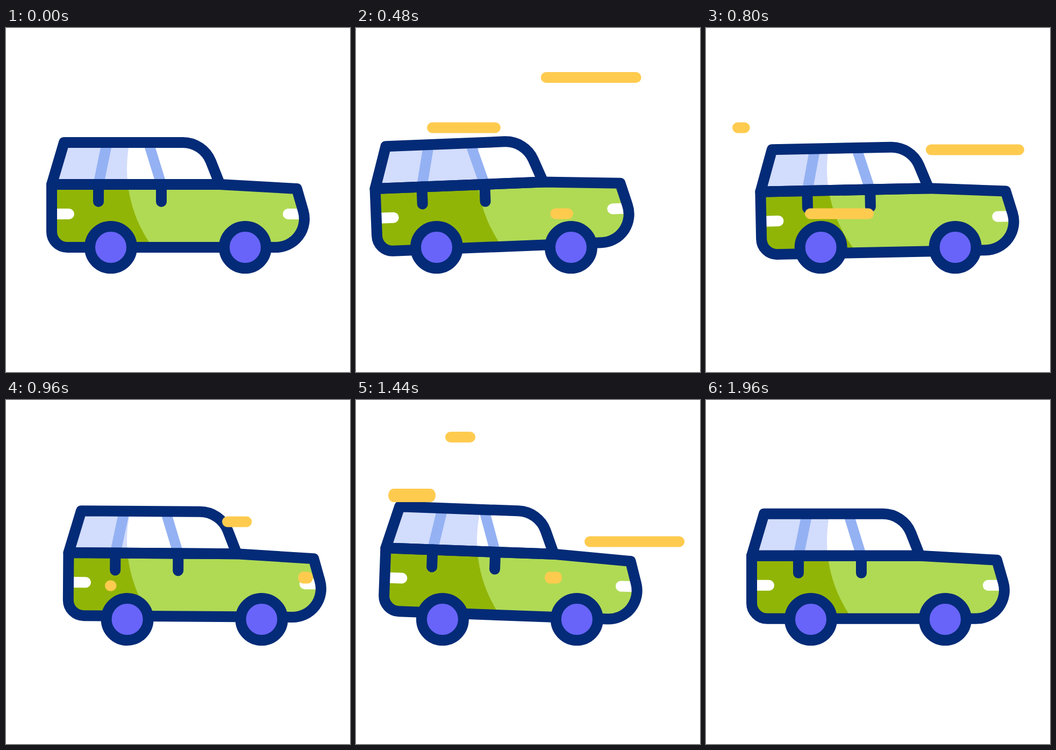
Animation of 640 by 640 pixels, one loop 2 s. Source, as an HTML page:

```html
<!DOCTYPE html>
<html lang="en">
<head>
<meta charset="utf-8">
<title>Bouncing car</title>
<style>
  html, body { margin: 0; width: 100%; height: 100%; overflow: hidden; background: #fff; }
  svg { display: block; width: 100%; height: 100%; }
  .line { fill: none; stroke: #042b77; stroke-width: 20; stroke-linecap: round; stroke-linejoin: round; }
</style>
</head>
<body>
<svg viewBox="0 0 640 640">
  <defs>
    <path id="body" d="M85 291V379A29 29 0 0 0 114 408H502A53 53 0 0 0 552.9 340.2L541 299L398 291Z"/>
    <path id="cabin" d="M85 291L108 213H329A56 56 0 0 1 381 248L398 291Z"/>
    <clipPath id="bodyClip"><use href="#body" class="pose"/></clipPath>
    <clipPath id="cabinClip"><use href="#cabin" class="pose"/></clipPath>
  </defs>

  <!-- The shade edge stays fixed on the stage while the car moves under it. -->
  <g clip-path="url(#cabinClip)">
    <rect width="640" height="640" fill="#d2dcfc"/>
    <circle cx="471" cy="262" r="246" fill="#fff"/>
  </g>
  <g clip-path="url(#bodyClip)">
    <rect width="640" height="640" fill="#91b507"/>
    <circle cx="471" cy="262" r="246" fill="#b0da54"/>
  </g>

  <g class="pose">
    <path fill="#94b1f3" d="M178 213H198L182 291H162ZM255 213H275L299 291H279Z"/>
    <path fill="#fff" d="M90 336H117A10 10 0 0 1 117 356H90ZM552 336H525A10 10 0 0 0 525 356H552Z"/>
    <use href="#cabin" class="line"/>
    <use href="#body" class="line"/>
    <path class="line" d="M172 291V323M289 291V323"/>
  </g>

  <g id="wheels" fill="#6864f9" stroke="#042b77" stroke-width="20">
    <circle cx="195" cy="408" r="39"/>
    <circle cx="445" cy="408" r="39"/>
  </g>
  <g id="streaks" fill="#ffcb4f"></g>
</svg>
<script>
  const LOOP = 2000, STEP = 40;

  // Keys are [time, value] pairs, eased between neighbours.
  const driftKeys = [[0, 0], [480, -45], [920, 32], [1360, -37], [1800, 0]];
  const tiltKeys = [[0, 0], [480, -2.28], [570, -2.28], [1270, 2.28], [1360, 2.28], [1800, 0]];
  const bounceKeys = [[0, 0], [125, -8], [345, 11], [570, -8], [790, 9], [1020, -8],
    [1210, 11], [1425, -7.3], [1640, 8], [1840, -8], [2000, 0]];

  const STREAK_LENGTH = 200;
  const streaks = [
    { start: 193, right: 530, y: 92 },
    { start: 275, right: 259, y: 185.5 },
    { start: 399, right: 394, y: 345.5 },
    { start: 474, right: 612, y: 226.5 },
    { start: 914, right: 561, y: 330.5, height: 22 },
    { start: 955, right: 376, y: 69 },
    { start: 995, right: 270, y: 177.5, height: 25 },
    { start: 1157, right: 609, y: 263.5 }
  ];

  const ease = p => (1 - Math.cos(Math.PI * Math.min(1, Math.max(0, p)))) / 2;

  function valueAt(keys, t) {
    const i = keys.findIndex(key => key[0] > t);
    if (i < 0) return keys[keys.length - 1][1];
    const [t0, v0] = keys[i - 1], [t1, v1] = keys[i];
    return v0 + (v1 - v0) * ease((t - t0) / (t1 - t0));
  }

  const layer = document.getElementById("streaks");
  for (const streak of streaks) {
    const { y, height = 20 } = streak;
    streak.rect = document.createElementNS("http://www.w3.org/2000/svg", "rect");
    const attrs = { y: y - height / 2, height, rx: 10, ry: height / 2 };
    for (const name in attrs) streak.rect.setAttribute(name, attrs[name]);
    layer.append(streak.rect);
  }

  function drawStreak({ start, right, rect }, t) {
    const head = ease((t - start) / 370);
    const tail = ease((t - start - 240) / 340);
    const visible = head > 0.002 && tail < 0.998;
    rect.setAttribute("x", right - head * STREAK_LENGTH - 10);
    rect.setAttribute("width", visible ? (head - tail) * STREAK_LENGTH + 20 : 0);
  }

  const posed = document.querySelectorAll(".pose");
  const wheels = document.getElementById("wheels");

  function draw(t) {
    const drift = valueAt(driftKeys, t);
    const pose = `translate(${drift} ${valueAt(bounceKeys, t)}) rotate(${valueAt(tiltKeys, t)} 320 408)`;
    posed.forEach(part => part.setAttribute("transform", pose));
    wheels.setAttribute("transform", `translate(${drift})`);
    streaks.forEach(streak => drawStreak(streak, t));
  }

  let origin;
  function tick(now) {
    origin ??= now;
    const t = (now - origin) % LOOP;
    draw(Math.floor(t / STEP) * STEP);
    requestAnimationFrame(tick);
  }
  draw(0);
  requestAnimationFrame(tick);
</script>
</body>
</html>
```
